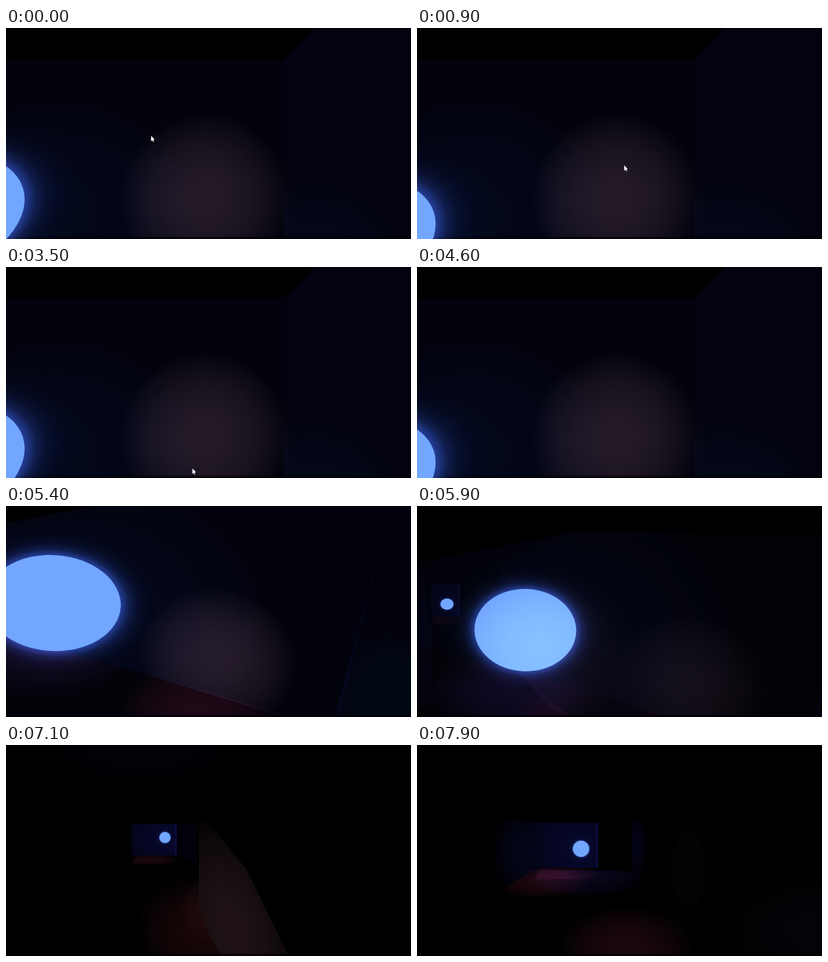
These frames come from a looping animation (716 px wide and 374 px high, 8000 ms). An HTML page with a canvas:

```html
<!DOCTYPE html>
<html lang="en">
<head>
<meta charset="utf-8">
<title>Glowing orbs in a dark room</title>
<style>
html, body { margin: 0; width: 100%; height: 100%; overflow: hidden; background: #000; }
canvas { display: block; }
</style>
</head>
<body>
<canvas id="stage" width="716" height="374"></canvas>
<script>
const W = 716, H = 374, LOOP = 8000;
const ctx = document.getElementById('stage').getContext('2d');

const mix = (a, b, k) => a + (b - a) * k;
const pose = (x, y, rx, ry, angle = 0) => ({ x, y, rx, ry, angle });

function mixPose(a, b, k) {
  const result = {};
  for (const key in a) result[key] = mix(a[key], b[key], k);
  return result;
}

function trace(points) {
  ctx.beginPath();
  points.forEach(([x, y]) => ctx.lineTo(x, y));
  ctx.closePath();
}

// Fills a flat surface and clips the lights that fall on it.
function surface(colour, points, lights = () => {}) {
  ctx.save();
  trace(points);
  ctx.fillStyle = colour;
  ctx.fill();
  ctx.clip();
  lights();
  ctx.restore();
}

const round = d => 1 - d * d;
const sharp = d => 1 - d ** 5;

// Elliptical light whose brightness follows a profile from centre (0) to rim (1).
function light({ x, y, rx, ry, angle }, rgb, profile = round) {
  ctx.save();
  ctx.translate(x, y);
  ctx.rotate(angle);
  ctx.scale(rx, ry);
  const gradient = ctx.createRadialGradient(0, 0, 0, 0, 0, 1);
  for (let d = 0; d <= 1; d += 1 / 16)
    gradient.addColorStop(d, `rgb(${rgb.map(c => c * profile(d))})`);
  ctx.fillStyle = gradient;
  ctx.beginPath();
  ctx.arc(0, 0, 1, 0, 7);
  ctx.fill();
  ctx.restore();
}

const NAVY = '#02020c', DIM = '#030209', BLACK = '#000';
const LAMP = [35, 24, 28], RED = [27, 7, 13], BLUE = [1, 5, 14], TEAL = [0, 5, 8];

// Where the camera looks at each stop; the picture is blended between stops.
const stops = [
  {
    time: 4700, big: pose(-132, 335, 170, 105, -.31), small: pose(-100, 174, 12, 10),
    paint() {
      surface(NAVY, [[-300, 55], [490, 55], [490, 400], [-300, 400]], () => {
        light(pose(95, 330, 240, 210), BLUE);
        light(pose(352, 302, 150, 153), LAMP);
      });
      surface('#03020e', [[490, 55], [545, 0], [900, 0], [900, 400], [490, 400]], () => {
        light(pose(540, 430, 175, 160), TEAL, sharp);
        light(pose(430, 310, 80, 120), [12, 5, 9]);
      });
    }
  },
  {
    time: 5400, big: pose(83, 172, 120, 85, .06), small: pose(-100, 174, 12, 10),
    paint() {
      surface(NAVY, [[-300, 90], [155, 0], [682, 0], [580, 400], [235, 295], [-300, 140]], () => {
        light(pose(120, 190, 340, 250), BLUE);
        light(pose(375, 270, 142, 125, .3), LAMP);
      });
      surface(DIM, [[-300, 140], [235, 295], [590, 400], [-300, 400]], () => {
        light(pose(340, 360, 135, 85), RED);
        light(pose(60, 250, 170, 90), [12, 6, 20]);
      });
      surface(NAVY, [[682, 0], [900, 0], [900, 400], [574, 400]], () =>
        light(pose(680, 340, 110, 115), TEAL, sharp));
    }
  },
  {
    time: 6400, big: pose(300, 268, 60, 61), small: pose(206, 174, 11, 10),
    room: pose(178, 138, 51, 57),
    paint() {
      surface(DIM, [[-300, -30], [153, 47], [178, 220], [178, 350], [-300, 500]], () =>
        light(pose(178, 260, 160, 150), [2, 3, 10]));
      surface(BLACK, [[298, 104], [510, 0], [900, -150], [900, 400], [430, 400], [298, 260]], () => {
        light(pose(430, 240, 310, 290), [3, 4, 15]);
        light(pose(420, 270, 115, 150, -.25), [22, 13, 15]);
      });
      light(pose(320, 340, 150, 75), [14, 12, 42]);
      surface(BLACK, [[300, 280], [430, 374], [300, 400]], () =>
        light(pose(385, 375, 60, 55), RED));
    }
  },
  {
    time: 7100, big: pose(690, 660, 130, 130), small: pose(281, 164, 10, 10),
    room: pose(222, 140, 80, 56),
    paint() {
      light(pose(240, 0, 200, 80), [2, 2, 8]);
      surface('#02010a', [[303, 140], [338, 140], [338, 210], [303, 197]]);
      surface(BLACK, [[200, 210], [341, 210], [341, 295], [378, 374], [200, 400]], () => {
        light(pose(345, 330, 116, 100), [23, 6, 8]);
        light(pose(355, 290, 50, 60), [10, 4, 6]);
      });
      surface(BLACK, [[341, 135], [356, 135], [425, 220], [500, 374], [378, 374], [341, 295]], () =>
        light(pose(400, 325, 112, 215, -.3), [30, 18, 20]));
    }
  },
  {
    time: 7900, big: pose(690, 660, 130, 130), small: pose(290, 184, 14.5, 14.5),
    room: pose(207, 138, 113, 80),
    paint() {
      surface(BLACK, [[130, 125], [207, 138], [207, 222], [140, 262]], () =>
        light(pose(195, 190, 65, 85), [4, 5, 25]));
      surface(BLACK, [[380, 134], [420, 130], [420, 230], [380, 224]], () =>
        light(pose(380, 180, 30, 60), [4, 4, 24]));
      surface(BLACK, [[140, 264], [207, 220], [390, 224], [430, 285]], () => {
        light(pose(215, 243, 90, 30), RED);
        light(pose(300, 222, 115, 50), [9, 6, 28]);
      });
      light(pose(370, 360, 120, 75), RED);
      light(pose(480, 220, 34, 75), [5, 2, 6], sharp);
      light(pose(716, 330, 170, 95), [5, 3, 9]);
    }
  }
];

// The far room: back wall, one bright corner and a strip of reddish floor.
function farRoom({ x, y, rx: w, ry: h }, orb) {
  surface('#04041a', [[x, y], [x + w, y], [x + w, y + h], [x, y + h]], () =>
    light(pose(orb.x, orb.y, w * .7, h), [2, 4, 15]));
  surface('#05061a', [[x + w - 3, y], [x + w, y], [x + w, y + h], [x + w - 3, y + h]]);
  surface(BLACK, [[x + w * .1, y + h], [x + w, y + h], [x + w * 1.1, y + h * 1.25], [x, y + h * 1.25]], () =>
    light(pose(x + w * .35, y + h * 1.15, w * .7, h * .25), RED));
}

const HALO = 1.8;
const haloProfile = d => Math.exp(-6 * Math.max(0, d * HALO - 1) / (HALO - 1)) * (1 - d ** 8);

function drawOrb(orb, glow, shine) {
  const { x, y, rx, ry, angle } = orb;
  ctx.globalCompositeOperation = 'lighter';
  light({ ...orb, rx: rx * HALO, ry: ry * HALO }, [34, 57, 132].map(c => c * glow), haloProfile);
  ctx.globalCompositeOperation = 'source-over';
  ctx.save();
  ctx.beginPath();
  ctx.ellipse(x, y, rx, ry, angle, 0, 7);
  ctx.fillStyle = '#72a6ff';
  ctx.fill();
  ctx.clip();
  ctx.globalCompositeOperation = 'lighter';
  light(pose(x + rx * .3, y + ry * .4, rx * 1.5, ry * 1.5), [42, 54, 0].map(c => c * shine));
  ctx.restore();
}

function drawCursor(s) {
  ctx.save();
  ctx.translate(
    256 + 110 * (1 - Math.exp(-2.5 * s)) + 37 * Math.sin(Math.PI * s),
    191 + 61.8 * s - 4.1 * s * s);
  trace([[.5, 0], [.5, 10], [2.6, 8], [4.2, 11], [5.6, 10.3], [4.2, 7.3], [7, 7]]);
  ctx.stroke();
  ctx.fillStyle = '#fff';
  ctx.fill();
  ctx.restore();
}

function draw(t) {
  const next = Math.max(1, stops.findIndex(stop => stop.time >= t));
  const from = stops[next - 1], to = stops[next];
  const k = Math.max(0, (t - from.time) / (to.time - from.time));
  const phase = next - 1 + k;
  const big = mixPose(from.big, to.big, k);
  const small = mixPose(from.small, to.small, k);
  const swing = 28 * (Math.sin(t / 500 - .77) + Math.sin(.77));

  ctx.globalCompositeOperation = 'source-over';
  ctx.fillStyle = BLACK;
  ctx.fillRect(0, 0, W, H);

  ctx.globalCompositeOperation = 'lighter';
  stops.forEach((stop, i) => {
    const weight = 1 - Math.abs(phase - i);
    if (weight <= 0) return;
    const [orb, anchor] = i < 2 ? [big, stop.big] : [small, stop.small];
    ctx.save();
    ctx.globalAlpha = weight;
    ctx.translate(orb.x - anchor.x, orb.y - anchor.y);
    stop.paint();
    if (stop.room) farRoom(stop.room, stop.small);
    ctx.restore();
  });

  ctx.globalCompositeOperation = 'source-over';
  ctx.fillStyle = 'rgba(0,0,4,.65)';
  ctx.fillRect(0, 370, W, 4);

  big.y += swing * Math.max(0, 1 - phase);
  if (phase > 1) drawOrb(small, .5, 0);
  if (phase < 3) drawOrb(big, 1, Math.min(1, Math.max(0, phase - 1)));
  if (t < 4800) drawCursor(t / 1000);
}

// The picture holds briefly at the start, then steps ten times a second.
function tick(now) {
  const t = Math.floor(now % LOOP / 100) * 100;
  draw(t < 300 ? 0 : t);
  requestAnimationFrame(tick);
}
requestAnimationFrame(tick);
</script>
</body>
</html>
```
